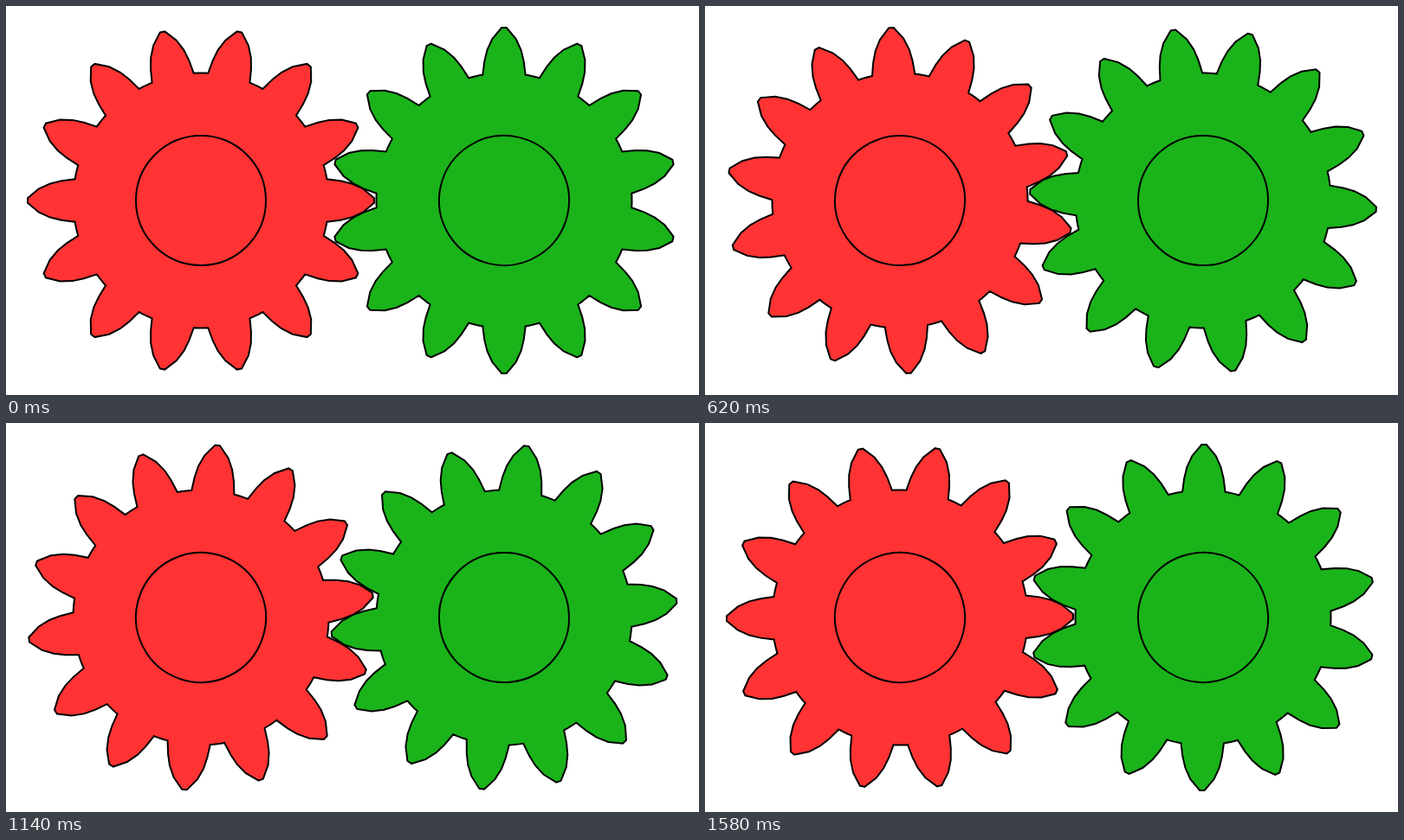
An HTML page with a canvas for the animation above (1600 ms loop, 800 by 450 pixels).

```html
<!DOCTYPE html>
<html lang="en">
<head>
<meta charset="utf-8">
<title>Meshing gears</title>
<style>
  html, body { margin: 0; width: 100%; height: 100%; overflow: hidden; background: #fff; }
  canvas { display: block; width: 800px; height: 450px; }
</style>
</head>
<body>
<canvas id="stage" width="800" height="450"></canvas>
<script>
const ctx = document.getElementById('stage').getContext('2d');

const LOOP = 1600, STEP = 20;
const TEETH = 14, MODULE = 25;
const PITCH = 2 * Math.PI / TEETH;
const PITCH_R = TEETH * MODULE / 2;
const HUB_R = 75;

// Half a tooth, from mid root to tip, as [radius, angle from tooth centre].
function halfTooth() {
  const root = PITCH_R - 1.1 * MODULE;
  const tip = PITCH_R + MODULE;
  const slim = TEETH ** -1.7;
  const tipHalf = PITCH / 8 - TEETH ** -1.2;
  return [
    [root, PITCH * 8 / 16],
    [root, PITCH * 7 / 16],
    [root, PITCH * 6 / 16],
    [PITCH_R - MODULE / 2, PITCH * 5 / 16],
    [PITCH_R, PITCH * 4 / 16],
    [PITCH_R + MODULE / 2, PITCH * 3 / 16 - slim],
    [tip, tipHalf],
    [tip, tipHalf / 2],
    [tip, 0]
  ];
}

function gearPath() {
  const path = new Path2D();
  const half = halfTooth();
  const tooth = [
    ...half.slice(1).map(([r, a]) => [r, -a]),
    ...half.slice(0, -1).reverse()
  ];
  for (let i = 0; i < TEETH; i++) {
    for (const [r, a] of tooth) {
      const angle = i * PITCH + a;
      path.lineTo(r * Math.cos(angle), r * Math.sin(angle));
    }
  }
  path.closePath();
  return path;
}

const gear = gearPath();
const hub = new Path2D();
hub.arc(0, 0, HUB_R, 0, 2 * Math.PI);

function drawGear(x, angle, color) {
  ctx.save();
  ctx.translate(x, 225);
  ctx.rotate(angle);
  ctx.fillStyle = color;
  ctx.fill(gear);
  ctx.stroke(gear);
  ctx.stroke(hub);
  ctx.restore();
}

function draw(ms) {
  const turn = Math.floor(ms % LOOP / STEP) * STEP / LOOP * PITCH;
  ctx.fillStyle = '#fff';
  ctx.fillRect(0, 0, 800, 450);
  ctx.strokeStyle = '#000';
  ctx.lineWidth = 2;
  drawGear(225, turn, '#ff3333');
  drawGear(575, PITCH / 2 - turn, '#1ab31a');
}

let start = null;
function tick() {
  const now = performance.now();
  if (start === null) start = now;
  draw(now - start);
  requestAnimationFrame(tick);
}
tick();
</script>
</body>
</html>
```
